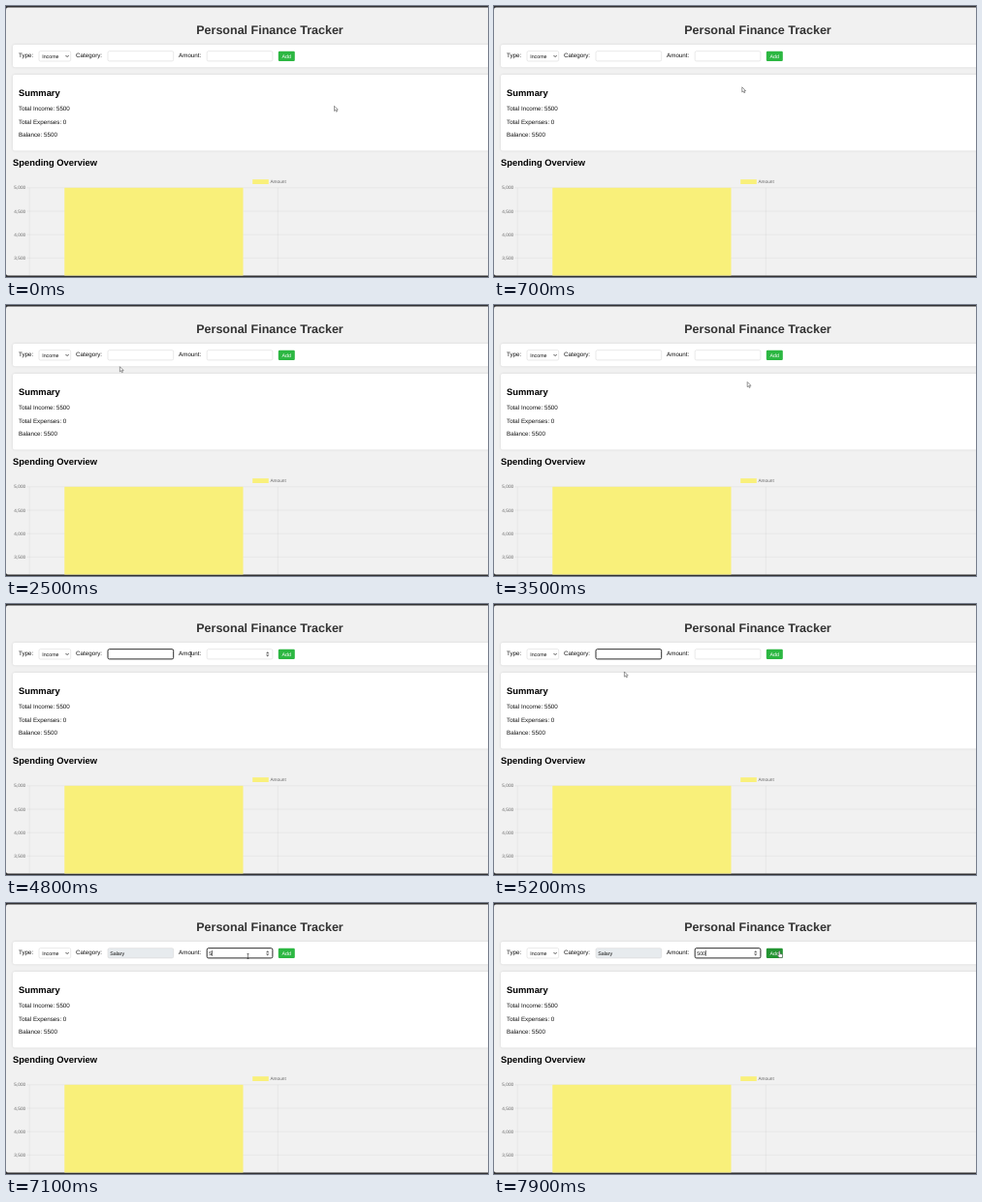
Recreate the animation shown at these times as an HTML page. Size 497 px wide and 280 px high, loop 8000 ms.

```html
<!DOCTYPE html>
<html lang="en">
<head>
<meta charset="utf-8">
<title>Personal Finance Tracker</title>
<style>
  html, body { margin: 0; width: 100%; height: 100%; overflow: hidden; background: #303032; }
  svg { display: block; width: 497px; height: 280px; }
  text { font-family: "Liberation Sans", Arial, sans-serif; font-size: 6.25px; fill: #111; text-rendering: geometricPrecision; }
  .title { font-size: 12.5px; font-weight: bold; fill: #333; text-anchor: middle; }
  .head { font-size: 9.4px; font-weight: bold; fill: #000; }
  .field { font-size: 5.3px; }
  .chart text { font-size: 4.75px; fill: #666; }
  .card { fill: #fff; filter: drop-shadow(0 .8px .8px #0002); }
  .box { fill: #fff; stroke: #d2d2d2; stroke-width: .5; }
  .box.filled { fill: #e7ebee; }
  .box.focus { stroke: #2a2a2a; stroke-width: 1; }
  .grid { stroke: #000; stroke-opacity: .08; stroke-width: .6; fill: none; }
</style>
</head>
<body>
<svg viewBox="0 0 497 280">
  <rect y="1.5" width="500" height="277" rx="2" fill="#f1f1f1"/>
  <text class="title" x="272" y="29.2">Personal Finance Tracker</text>

  <rect class="card" x="7" y="40" width="500" height="23.2" rx="2"/>
  <text x="13" y="53.3">Type:</text>
  <rect class="box" x="34" y="46.6" width="32.7" height="10.4" rx="1.6"/>
  <text class="field" x="37.2" y="53.6">Income</text>
  <path d="M61.5 51l1.6 1.6 1.6-1.6" fill="none" stroke="#222" stroke-width=".8"/>
  <text x="72" y="53.3">Category:</text>
  <rect class="box" id="category" x="105" y="46.7" width="67.7" height="10.2" rx="1.6"/>
  <text class="field" id="categoryText" x="107.2" y="53.5"></text>
  <text x="178" y="53.3">Amount:</text>
  <rect class="box" id="amount" x="207.2" y="46.7" width="67.7" height="10.2" rx="1.6"/>
  <text class="field" id="amountText" x="209.2" y="53.5"></text>
  <path id="spinner" d="M268 51.2l1.7-2 1.7 2zM268 52.6l1.7 2 1.7-2z" fill="#666"/>
  <path id="caret" d="M0 49v5.8" stroke="#000" stroke-width=".6"/>
  <rect id="add" x="280.8" y="46.8" width="17" height="10.2" rx="1.2"/>
  <text class="field" x="289.3" y="53.6" text-anchor="middle" style="fill:#fff">Add</text>

  <rect class="card" x="7" y="71" width="500" height="78.5" rx="2"/>
  <text class="head" x="13" y="93">Summary</text>
  <text x="13" y="108.2">Total Income: 5500</text>
  <text x="13" y="121.7">Total Expenses: 0</text>
  <text x="13" y="135.2">Balance: 5500</text>

  <text class="head" x="7" y="165.3">Spending Overview</text>
  <g class="chart">
    <rect x="254.2" y="179.2" width="16.6" height="4.8" fill="#f9f07a"/>
    <text x="272.4" y="183.1">Amount</text>
    <path class="grid" d="M21 187.8H497M21 212H497M21 236.2H497M21 260.4H497M24.2 187.8V278.5M280.3 187.8V278.5"/>
    <rect x="60.3" y="187.8" width="184.2" height="90.7" fill="#f9f07a"/>
    <g text-anchor="end">
      <text x="20.2" y="189.4">5,000</text>
      <text x="20.2" y="213.6">4,500</text>
      <text x="20.2" y="237.8">4,000</text>
      <text x="20.2" y="262">3,500</text>
    </g>
  </g>

  <g id="pointer" stroke="#555" stroke-width=".6" fill="#fff">
    <path id="arrow" d="M0 0V5.2L1.2 4.1 2.1 6 3 5.6 2.2 3.8H3.8Z"/>
    <path id="beam" d="M-1-2.5H1M0-2.5V2.5M-1 2.5H1" stroke="#333"/>
    <path id="hand" d="M0-2.6q.7-.7 1.2 0V0l2 .5q.8.3.6 1.2L3.2 4H.3L-1.6 1.5q0-.8.8-.5L0 1.6Z"/>
  </g>
</svg>
<script>
const $ = id => document.getElementById(id);
const LOOP = 8000;

// Pointer stops: time, x, y
const stops = [
  [0, 338.5, 103.3], [100, 338.5, 103.3], [1400, 152, 59.3], [1900, 61.5, 54.3], [2250, 61.5, 54.3],
  [2800, 190, 76], [3050, 190, 76], [3500, 261.2, 79.5], [4050, 145, 52], [4250, 145, 52],
  [4550, 225, 52], [4800, 190.5, 52], [5300, 128, 72], [5800, 123.7, 109.5], [5950, 123.7, 109.5],
  [6600, 249.5, 55], [7500, 249.5, 55], [7800, 293.8, 52.5], [LOOP, 293.8, 52.5]
];

function pointerAt(t) {
  const i = stops.findIndex(s => s[0] > t);
  const [t0, x0, y0] = stops[i - 1], [t1, x1, y1] = stops[i];
  const p = (t - t0) / (t1 - t0), e = p * p * (3 - 2 * p);
  return [x0 + (x1 - x0) * e, y0 + (y1 - y0) * e];
}

const show = (id, on) => $(id).style.display = on ? "" : "none";

function draw(t) {
  const [x, y] = pointerAt(t);
  const inRow = y > 46.5 && y < 57.2;
  const overAdd = inRow && x > 280.5 && x < 298;
  const overAmount = inRow && x > 207 && x < 275;
  const overText = overAmount || inRow && (x > 105 && x < 173 || x > 178 && x < 203);
  const onCategory = t >= 4150 && t < 6650, onAmount = t >= 6650;
  const category = t >= 5500 ? "Salary" : "";
  const amount = "500".slice(0, t < 7050 ? 0 : t < 7250 ? 1 : t < 7400 ? 2 : 3);

  $("categoryText").textContent = category;
  $("amountText").textContent = amount;
  $("category").classList.toggle("filled", category !== "");
  $("category").classList.toggle("focus", onCategory);
  $("amount").classList.toggle("focus", onAmount);
  $("add").setAttribute("fill", overAdd ? "#239432" : "#2cb742");
  show("spinner", overAmount || onAmount || t >= 4400 && t < 4900);

  const caretX = onAmount ? 209.5 + amount.length * 2.95 : 107.5 + (category ? 15.3 : 0);
  $("caret").setAttribute("transform", `translate(${caretX})`);
  show("caret", onAmount || onCategory && category);

  $("pointer").setAttribute("transform", `translate(${x} ${y})`);
  show("hand", overAdd);
  show("beam", overText);
  show("arrow", !overAdd && !overText);
}

function tick() {
  draw(performance.now() % LOOP);
  requestAnimationFrame(tick);
}
tick();
</script>
</body>
</html>
```
